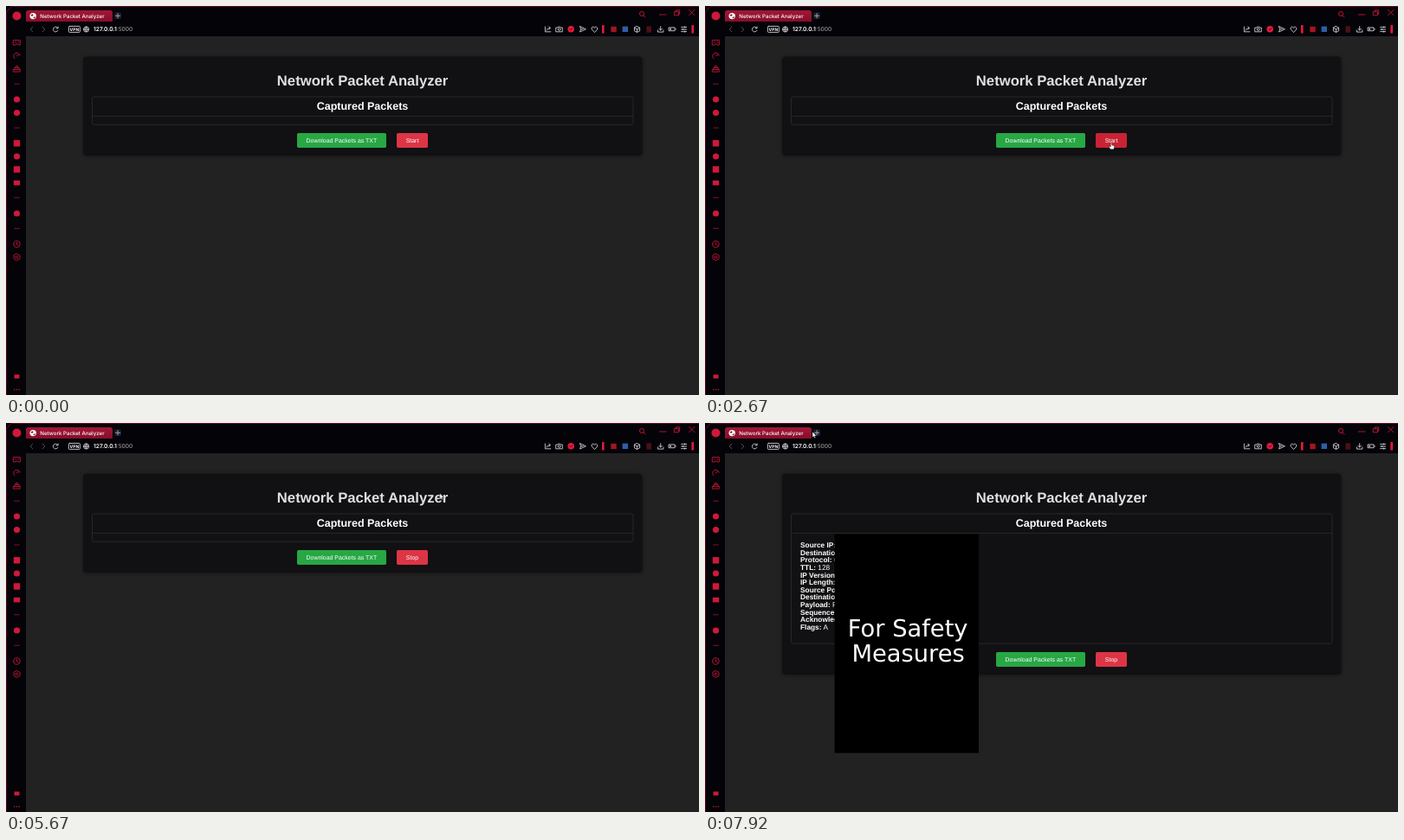
An HTML page that plays this animation: 800 by 450 pixels, repeating every 8000 ms.

```html
<!DOCTYPE html>
<html lang="en">
<head>
<meta charset="utf-8">
<title>Network Packet Analyzer</title>
<style>
  html, body { margin: 0; width: 100%; height: 100%; overflow: hidden; background: #040308; }
  svg { display: block; width: 100vw; height: 100vh; }
  text { font-family: "Liberation Sans", Arial, sans-serif; fill: #fff; text-rendering: geometricPrecision; white-space: pre; }
  .ui { font-family: Inter, sans-serif; }
  .wide { font-family: "DejaVu Sans", sans-serif; }
  .mid { text-anchor: middle; }
  .b { font-weight: 700; }
  .line { fill: none; stroke-width: .85; stroke-linecap: round; stroke-linejoin: round; }
</style>
</head>
<body>
<svg id="stage" viewBox="0 0 800 450">
  <defs>
    <linearGradient id="tabFill" x2="0" y2="1">
      <stop stop-color="#a31636"/><stop offset="1" stop-color="#850f2b"/>
    </linearGradient>
    <linearGradient id="dialogFill" x2="0" y2="1">
      <stop stop-color="#302a45"/><stop offset="1" stop-color="#1b1628"/>
    </linearGradient>
    <filter id="shadow" x="-5%" y="-20%" width="110%" height="140%" color-interpolation-filters="sRGB">
      <feDropShadow dx="0" dy="1" stdDeviation="2" flood-opacity=".4"/>
    </filter>
  </defs>

  <rect width="800" height="450" fill="#040308"/>
  <rect x="23" y="35" width="777" height="415" fill="#222223"/>
  <path d="M.4 450V7L6 .5H800" fill="none" stroke="#780c25" stroke-width=".9"/>

  <!-- page -->
  <rect id="card" x="89" y="58.5" width="645.5" height="114.5" rx="4" fill="#111012" filter="url(#shadow)"/>
  <text class="mid b" x="411.6" y="91.6" font-size="16.67" style="fill:#e0e0e0">Network Packet Analyzer</text>
  <rect id="panel" x="99.5" y="105" width="624.5" height="32.2" rx="2" fill="none" stroke="#2e2d30" stroke-width=".8"/>
  <path d="M99.5 127.5H724" stroke="#2e2d30" stroke-width=".8"/>
  <text class="mid b" x="411.5" y="120.4" font-size="12.5">Captured Packets</text>
  <g id="packets" font-size="8.33"></g>
  <g id="buttons" font-size="6.94">
    <rect x="336" y="147" width="103" height="17" rx="1.7" fill="#28a745"/>
    <text class="mid" x="387.4" y="157.8">Download Packets as TXT</text>
    <rect id="toggle" x="451" y="147" width="36" height="17" rx="1.7" fill="#dc3545"/>
    <text id="toggleText" class="mid" x="469" y="157.8">Start</text>
  </g>

  <!-- browser frame -->
  <path d="M23 18V8Q23 5 26 5H120Q123 5 123 8V18Z" fill="url(#tabFill)"/>
  <circle cx="31.2" cy="11.6" r="3.7" fill="#fff"/>
  <path d="M28.5 10.5l2.2-1.3 1 1.5-1.7 1.2zM31.3 13.5l1.8-1.3 1 .5-1.6 1.8z" fill="#7d1230"/>
  <text class="ui" x="39.3" y="13.8" font-size="6.15" font-weight="500">Network Packet Analyzer</text>
  <rect x="125.3" y="7.5" width="7.6" height="7.6" rx="1" fill="#1b1d2b"/>
  <rect x="72.4" y="23.4" width="13" height="7" rx="1" class="line" stroke="#ddd"/>
  <text class="ui mid b" x="78.9" y="28.7" font-size="4.9">VPN</text>
  <text class="ui" x="101" y="29.2" font-size="6.7"><tspan font-weight="600">127.0.0.1</tspan><tspan fill="#aaa8ae">:5000</tspan></text>
  <g id="icons"></g>
  <g id="plainTools"></g>
  <g id="alertTools"></g>

  <g id="dialog">
    <rect x="294.5" y="31.6" width="234" height="65.6" rx="1.5" fill="url(#dialogFill)"/>
    <text class="wide b" x="305.5" y="49.5" font-size="6.95">127.0.0.1:5000 SAYS</text>
    <text class="ui" x="305.5" y="62.2" font-size="6.1" style="fill:#c0bccb">Packet capture started.</text>
    <rect x="490.3" y="70" width="28.8" height="19" rx="2" fill="#1d1829" stroke="#cfafba" stroke-width="1"/>
    <rect x="491.6" y="71.3" width="26.2" height="16.4" rx="1" fill="#fa1e4e"/>
    <text class="ui mid" x="504.7" y="81.8" font-size="6">OK</text>
  </g>

  <g id="cursor">
    <path id="arrow" d="M0 0V6.6L1.5 5.3 2.5 7.6 3.6 7.1 2.6 4.9H4.7Z" fill="#fff" stroke="#000" stroke-width=".4"/>
    <path id="hand" d="M-.7 .4Q0-.5 .7 .4V2.9L3 3.4Q3.8 3.6 3.6 4.6L3 7.8H-.9L-2.8 5Q-2.6 3.9-1.6 4.4L-.7 5.2Z" fill="#fff" stroke="#000" stroke-width=".4"/>
    <path id="beam" d="M-1.4-3.6H1.4M0-3.6V3.6M-1.4 3.6H1.4" fill="none" stroke="#d0d0d0" stroke-width=".7"/>
  </g>

  <g id="cover">
    <rect x="149.6" y="128.3" width="166.4" height="253.4"/>
    <g class="mid" font-size="27.3">
      <text class="wide" x="234.2" y="247.3">For Safety</text>
      <text class="wide" x="234.6" y="276.2">Measures</text>
    </g>
  </g>
</svg>

<script>
const $ = id => document.getElementById(id);
const RED = '#d0183a', WHITE = '#d9d8dc', DIM = '#5c5963';

function add(parent, tag, attrs, text = '') {
  const el = document.createElementNS('http://www.w3.org/2000/svg', tag);
  for (const key in attrs) el.setAttribute(key, attrs[key]);
  el.textContent = text;
  return parent.appendChild(el);
}
const icon = (x, y, d, stroke = RED, parent = $('icons')) =>
  add(parent, 'path', { d, stroke, class: 'line', transform: `translate(${x} ${y})` });
const dot = (x, y, r, fill = RED, parent = $('icons')) =>
  add(parent, 'circle', { cx: x, cy: y, r, fill });
const square = (x, y, w, h, fill = RED) =>
  add($('icons'), 'rect', { x: x - w / 2, y: y - h / 2, width: w, height: h, fill });
const ring = r => `M${-r} 0A${r} ${r} 0 1 1 ${r} 0A${r} ${r} 0 1 1 ${-r} 0`;

// sidebar
dot(12.5, 11.5, 5);
icon(12.5, 42.3, 'M-3.8-2.7H3.8V2.7H1.2L0 1.2-1.2 2.7H-3.8ZM-2.2-.4h1M1.2-.4h1');
icon(12.5, 57.7, 'M-2.7 3A3.8 3.8 0 1 1 3.7-.6M0 0L2.2-1.4');
icon(12.5, 72.6, 'M-3.8 3.5H3.8V1H-3.8ZM-2.8 1V-1H2.8V1M-1.2-1V-3.2H1.2V-1');
for (const y of [90.2, 141, 221.8, 257.3]) icon(12.5, y, 'M-2.8 0H2.8', '#a3122e');
for (const y of [108, 123.5, 174, 240]) dot(12.5, y, 3.6);
for (const y of [158.8, 189, 204.6]) square(12.5, y, 7.4, y > 200 ? 5.6 : 7.4);
icon(12.5, 275.5, ring(3.8) + 'M0-2V.3L1.6 1.2');
icon(12.5, 290.5, 'M0-3.9L3.5-2V2L0 3.9-3.5 2V-2Z' + ring(1.4));
square(12.5, 428.6, 6, 4.4);
for (const x of [9.8, 12.5, 15.2]) dot(x, 443.7, .8);

// window and address controls
icon(129.1, 11.3, 'M-2.6 0H2.6M0-2.6V2.6', '#aab4d4');
icon(734, 9, ring(2.6) + 'M2 2L4 4');
icon(758.3, 10, 'M-3.8 0H3.8');
icon(774.7, 7.8, 'M-3-1.2H1.8V3H-3ZM-1.2-1.4V-3H3V1.4H2');
icon(791.7, 7.6, 'M-3.2-3.2L3.2 3.2M3.2-3.2L-3.2 3.2');
icon(29.5, 27, 'M1.3-2.8L-1.4 0 1.3 2.8', DIM);
icon(43.5, 27, 'M-1.3-2.8L1.4 0-1.3 2.8', DIM);
icon(57.4, 27, 'M2.5 1.4A2.9 2.9 0 1 1 2.2-1.8M2.7-3V-1.1H.8', WHITE);
icon(92.6, 27, ring(3.1) + 'M-3 0H3M0-3Q-2.6 0 0 3Q2.6 0 0-3', WHITE);

// extensions
for (const x of [689.3, 792.7]) square(x, 26.8, 2.6, 9.4, '#e5193d');
square(701.5, 27, 6.4, 6.4, '#a31522');
square(714.8, 26.8, 6.4, 6.4, '#2c5fa8');
icon(728.5, 27, 'M0-3.4L3.1-1.8V1.8L0 3.4-3.1 1.8V-1.8ZM-3-1.7L0 0 3-1.7M0 0V3.3', WHITE);
square(742.2, 27, 5.6, 7.4, '#4b1018');
icon(755.7, 27, 'M0-3.3V1M-1.8-.8L0 1 1.8-.8M-3.2 1V3.1H3.2V1', WHITE);
icon(769, 26.8, 'M-3.6-1.9H3V1.9H-3.6ZM4-.6V.6M-2.4-.6V.6M-1.4-.6V.6', WHITE);
icon(782.6, 27, 'M-3-2.6H3M-3 0H3M-3 2.6H3M1-3.2V-2M-1-.6V.6M1 2V3.2', WHITE);

function shieldAndPlane(parent, x) {
  dot(x, 26.8, 3.8, '#e5193d', parent);
  icon(x, 26.8, 'M-1.4 0L-.3 1.1 1.6-1', '#2a0710', parent);
  icon(x + 13.6, 26.8, 'M-3.2-3.2L3.6 0-3.2 3.2-2.2 0ZM-2.2 0H.5', WHITE, parent);
}
shieldAndPlane($('plainTools'), 652.2);
icon(625.6, 26.8, 'M-3.2-2.8V3H3.2M-1.6 1.2Q-.9-1.3 2.6-1.3M1.2-2.9L2.8-1.3 1.2 .3', WHITE, $('plainTools'));
icon(638.7, 27, 'M-3.6-2H-1.6L-.8-3H.8L1.6-2H3.6V2.8H-3.6Z' + ring(1.4), WHITE, $('plainTools'));
icon(679.4, 27, 'M0 3.2L-3.2 0Q-4-2.2-2-2.9Q-.6-3.1 0-1.6Q.6-3.1 2-2.9Q4-2.2 3.2 0Z', WHITE, $('plainTools'));
shieldAndPlane($('alertTools'), 665.6);

// packet details
['Source IP:', 'Destination IP:', 'Protocol: 6', 'TTL: 128', 'IP Version:', 'IP Length:', 'Source Port:',
 'Destination Port:', 'Payload: P', 'Sequence Number:', 'Acknowledgment:', 'Flags: A'].forEach((row, i) => {
  const [label, value] = row.split(':');
  const line = add($('packets'), 'text', { x: 110, y: 144 + i * 8.64 });
  add(line, 'tspan', { class: 'b' }, label + ':');
  add(line, 'tspan', {}, value);
});

// time, x, y, pointer shape
const path = [
  [1000, 640, 452, 'arrow'], [1580, 494, 208, 'arrow'], [1830, 494, 208, 'arrow'],
  [2330, 469, 158, 'hand'], [3000, 469, 158, 'arrow'], [3750, 400, 60, 'beam'],
  [4150, 400, 60, 'beam'], [4580, 369, 55, 'arrow'], [4920, 369, 55, 'arrow'],
  [5330, 502, 80, 'arrow'], [5920, 500, 82, 'arrow'], [6500, 432, 123, 'beam'],
  [6920, 432, 123, 'arrow'], [7500, 290, 70, 'arrow'], [7830, 124, 10, 'arrow'], [8000, 124, 10, 'arrow']
];
const DIALOG = [3000, 5410], COVER = 7490, PACKETS = 7570;
const show = (id, on) => $(id).style.display = on ? '' : 'none';

function draw(t) {
  const next = path.findIndex(p => p[0] > t);
  show('cursor', next > 0);
  if (next > 0) {
    const [t0, x0, y0, shape] = path[next - 1], [t1, x1, y1] = path[next];
    const u = (t - t0) / (t1 - t0), e = u * u * (3 - 2 * u);
    $('cursor').setAttribute('transform', `translate(${x0 + (x1 - x0) * e} ${y0 + (y1 - y0) * e})`);
    for (const s of ['arrow', 'hand', 'beam']) show(s, s === shape);
  }

  const alert = t >= DIALOG[0] && t < DIALOG[1];
  show('dialog', alert);
  show('alertTools', alert);
  show('plainTools', !alert);
  $('toggle').setAttribute('fill', t >= 2240 && t < DIALOG[1] ? '#c82333' : '#dc3545');
  $('toggleText').textContent = t < DIALOG[1] ? 'Start' : 'Stop';

  const grow = t >= PACKETS ? 118 : 0;
  show('packets', grow);
  show('cover', t >= COVER);
  $('card').setAttribute('height', 114.5 + grow);
  $('panel').setAttribute('height', 32.2 + grow);
  $('buttons').setAttribute('transform', `translate(0 ${grow})`);
}

const LOOP = 8000, STEP = 1000 / 12, start = performance.now();
function tick() {
  const t = (performance.now() - start) % LOOP;
  draw(Math.floor((t + 5) / STEP) * STEP % LOOP);
  requestAnimationFrame(tick);
}
tick();
</script>
</body>
</html>
```
